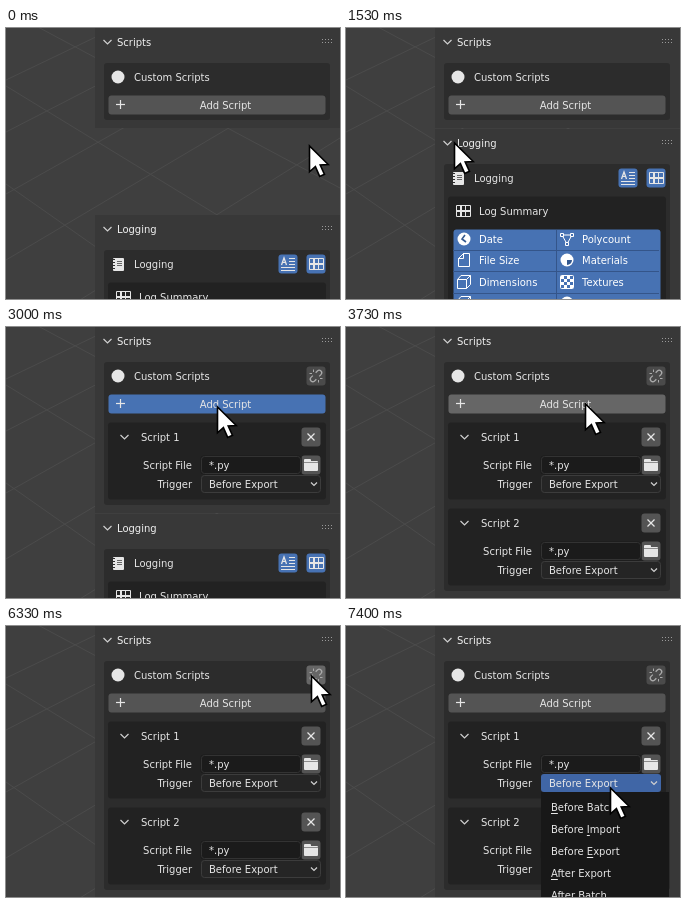
Animation of 334x271 px, one loop 8 s. Source, as an HTML page with a canvas:

```html
<!DOCTYPE html>
<html lang="en">
<head>
<meta charset="utf-8">
<title>Script panel</title>
<style>
html, body { margin: 0; width: 100%; height: 100%; overflow: hidden; background: #3f3f3f; }
canvas { display: block; width: 334px; height: 271px; }
</style>
</head>
<body>
<canvas id="stage" width="334" height="271"></canvas>
<script>
const ctx = document.getElementById('stage').getContext('2d');
const LOOP = 8000, FPS = 15;
const BLUE = '#4772b3', WHITE = '#e6e6e6', GREY = '#545454', HOVER = '#666666', INNER = '#222222';
let cursor = { x: 0, y: 0 };

// ---- drawing helpers ----
function box(x, y, w, h, color, r = 3) {
  ctx.fillStyle = color;
  ctx.beginPath();
  ctx.roundRect(x, y, w, h, r);
  ctx.fill();
}

function outline(x, y, w, h, color, r = 3) {
  ctx.strokeStyle = color;
  ctx.lineWidth = 1;
  ctx.beginPath();
  ctx.roundRect(x + .5, y + .5, w - 1, h - 1, r);
  ctx.stroke();
}

function text(s, x, y, align = 'left', color = WHITE) {
  ctx.font = '10px "DejaVu Sans", sans-serif';
  ctx.textAlign = align;
  ctx.fillStyle = color;
  ctx.fillText(s, x, Math.round(y) + 4);
}

function line(points, color = WHITE, width = 1.2, close = false) {
  ctx.strokeStyle = color;
  ctx.lineWidth = width;
  ctx.beginPath();
  points.forEach(([x, y]) => ctx.lineTo(x, y));
  if (close) ctx.closePath();
  ctx.stroke();
}

function disc(x, y, r, color = WHITE) {
  ctx.fillStyle = color;
  ctx.beginPath();
  ctx.arc(x, y, r, 0, Math.PI * 2);
  ctx.fill();
}

const chevron = (x, y, s = 4) =>
  line([[x - s, y - s / 2], [x, y + s / 2], [x + s, y - s / 2]], '#d0d0d0', 1.2);

const hovered = (x, y, w, h) =>
  cursor.x >= x && cursor.x < x + w && cursor.y >= y && cursor.y < y + h;

function button(x, y, w, h, pressed = false, base = GREY, over = HOVER) {
  box(x - .5, y - .5, w + 1, h + 1, pressed ? BLUE : hovered(x, y, w, h) ? over : base);
}

// ---- icons, centred on x, y ----
const icons = {
  table(x, y, back) {
    box(x - 7, y - 6, 15, 12, WHITE, 1);
    for (const dy of [-5, 1]) {
      box(x - 6, y + dy, 3, 4, back, 0);
      box(x - 1, y + dy, 8, 4, back, 0);
    }
    box(x + 2, y - 5, 1, 10, WHITE, 0);
  },
  card(x, y) {
    line([[x - 6.5, y + 1], [x - 4, y - 6], [x - 1.5, y + 1]], WHITE, 1.3);
    line([[x - 6, y - 1.5], [x - 2, y - 1.5]], WHITE, 1);
    for (const dy of [-5.5, -2.5, .5]) line([[x + 1, y + dy], [x + 7, y + dy]], WHITE, 1);
    for (const dy of [3.5, 6.5]) line([[x - 7, y + dy], [x + 7, y + dy]], WHITE, 1);
  },
  book(x, y) {
    box(x - 5, y - 6, 11, 13, WHITE, 1);
    for (let i = 0; i < 4; i++) {
      box(x - 6, y - 5 + i * 3, 3, 1, '#2c2c2c', 0);
      if (i < 3) box(x - 1, y - 3 + i * 2, 5, 1, '#666', 0);
    }
  },
  clock(x, y) {
    disc(x, y, 6.5, '#fff');
    line([[x + 1, y - 4], [x - 2, y], [x + 2, y + 3]], '#34598f', 1.6);
  },
  mesh(x, y) {
    const pts = [[x - 5, y - 4], [x + 5, y - 4], [x, y + 5]];
    line(pts, '#fff', 1, true);
    for (const [px, py] of pts) {
      box(px - 2, py - 2, 4, 4, '#fff', 1);
      box(px - 1, py - 1, 2, 2, BLUE, 0);
    }
  },
  file(x, y) {
    line([[x - 1, y - 6.5], [x + 5.5, y - 6.5], [x + 5.5, y + 6.5], [x - 5.5, y + 6.5], [x - 5.5, y - 2]], '#fff', 1);
    line([[x - 5.5, y - 1.5], [x - .5, y - 1.5], [x - .5, y - 6.5]], '#fff', 1, true);
  },
  sphere(x, y) {
    disc(x, y, 6.5, '#fff');
    ctx.fillStyle = '#34598f';
    ctx.beginPath();
    ctx.moveTo(x, y);
    ctx.arc(x, y, 5, 0, Math.PI / 2);
    ctx.fill();
  },
  cube(x, y) {
    outline(x - 7, y - 3, 10, 10, '#fff', 0);
    line([[x - 6.5, y - 2.5], [x - 3, y - 6.5], [x + 6.5, y - 6.5], [x + 6.5, y + 2.5], [x + 2.5, y + 6.5]], '#fff', 1);
    line([[x + 2.5, y - 2.5], [x + 6.5, y - 6.5]], '#fff', 1);
  },
  checker(x, y) {
    outline(x - 7, y - 7, 14, 14, '#fff', 1);
    for (let i = 0; i < 16; i++)
      if ((i + (i >> 2)) % 2 === 0) box(x - 6 + (i % 4) * 3, y - 6 + (i >> 2) * 3, 3, 3, '#fff', 0);
  },
  folder(x, y) {
    box(x - 7, y - 6, 7, 4, WHITE, 1);
    box(x - 7, y - 4, 14, 10, WHITE, 1);
    line([[x - 7, y - 2.5], [x + 7, y - 2.5]], '#777', .8);
  },
  cross(x, y) {
    line([[x - 3.5, y - 3.5], [x + 3.5, y + 3.5]]);
    line([[x + 3.5, y - 3.5], [x - 3.5, y + 3.5]]);
  },
  link(x, y, joined) {
    const color = joined ? '#fff' : '#aaa';
    ctx.save();
    ctx.translate(x, y);
    ctx.rotate(-Math.PI / 4);
    ctx.strokeStyle = color;
    ctx.lineWidth = 1.3;
    for (const side of [-1, 1]) {
      ctx.beginPath();
      if (joined) {
        ctx.roundRect(side * 3 - 3.8, -2.4, 7.6, 4.8, 2.4);
      } else {
        ctx.moveTo(side * 2, -2.5);
        ctx.lineTo(side * 4.5, -2.5);
        ctx.arc(side * 4.5, 0, 2.5, -Math.PI / 2, Math.PI / 2, side < 0);
        ctx.lineTo(side * 2, 2.5);
      }
      ctx.stroke();
    }
    ctx.restore();
    if (joined) return;
    for (const s of [-1, 1]) {
      line([[x + s * 2.5, y + s * 4], [x + s * 2.5, y + s * 6.5]], color, 1);
      line([[x + s * 4, y + s * 2.5], [x + s * 6.5, y + s * 2.5]], color, 1);
    }
  }
};

// ---- scene parts ----
function viewport() {
  ctx.fillStyle = '#3f3f3f';
  ctx.fillRect(0, 0, 334, 271);
  for (const [y0, y1] of [[-76, 84], [-18, 160], [58, 262], [156, 390]]) line([[0, y0], [334, y1]], '#4b4b4b', 1);
  for (const [y0, y1] of [[52, -108], [104, -68], [166, -22], [232, 34], [318, 110]]) line([[0, y0], [334, y1]], '#4b4b4b', 1);
}

function panel(top, height, title) {
  box(89, top, 245, height, '#383838', 0);
  chevron(101.5, top + 14);
  text(title, 111, top + 14, 'left', '#f0f0f0');
  for (let i = 0; i < 8; i++) box(316 + (i % 4) * 3, top + 11 + (i >> 2) * 3, 1, 1, '#9a9a9a', 0);
}

function dropdown(x, y, w, open) {
  box(x, y, w, 18, open ? '#4066a6' : hovered(x, y, w, 18) ? '#3a3a3a' : '#252525');
  if (!open) outline(x, y, w, 18, '#3c3c3c');
  text('Before Export', x + 8, y + 9);
  chevron(x + w - 7, y + 9, 3);
}

function scriptBox(index, top, linked, open) {
  box(102, top - .5, 218, linked ? 57 : 77, INNER);
  chevron(118.5, top + 14);
  text('Script ' + (index + 1), 135, top + 14);
  button(296, top + 5, 18, 18);
  icons.cross(305, top + 14);

  text('Script File', 186, top + 42, 'right');
  button(296, top + 33, 18, 18);
  icons.folder(305, top + 42);
  button(195, top + 33, 100, 18, false, '#1b1b1b', '#242424');
  outline(195, top + 33, 100, 18, '#333');
  text('*.py', 203, top + 42);

  if (linked) return;
  text('Trigger', 186, top + 61, 'right');
  dropdown(195, top + 52, 120, open);
}

function scriptsPanel({ count, linked, addPressed, linkPressed, menuOpen }) {
  const pitch = linked ? 66 : 86;
  const bottom = 92 + count * pitch + (linked ? 27 : 0);
  panel(0, bottom + 8, 'Scripts');
  box(98, 35, 226, bottom - 35, '#2c2c2c');
  disc(112, 49, 6.5);
  text('Custom Scripts', 128, 49);
  if (count) {
    const base = linked ? BLUE : '#4a4a4a', over = linked ? '#5a85c5' : HOVER;
    button(301, 40, 18, 18, linkPressed, base, over);
    icons.link(310, 49, linked);
  }
  button(103, 68, 216, 18, addPressed);
  line([[110, 76.5], [119, 76.5]]);
  line([[114.5, 72], [114.5, 81]]);
  text('Add Script', 219.5, 77, 'center');

  for (let i = 0; i < count; i++) scriptBox(i, 96 + i * pitch, linked, menuOpen && i === 0);
  if (linked) {
    text('Trigger', 186, 237, 'right');
    dropdown(195, 228, 124, false);
  }
}

const LOG_ITEMS = [
  ['Date', 'clock'], ['Polycount', 'mesh'],
  ['File Size', 'file'], ['Materials', 'sphere'],
  ['Dimensions', 'cube'], ['Textures', 'checker'],
  ['Objects', 'cube'], ['Animation', 'sphere']
];

function loggingPanel(top) {
  panel(top, 300, 'Logging');
  box(98, top + 35, 226, 300, '#2c2c2c');
  icons.book(112, top + 49);
  text('Logging', 128, top + 49);
  button(273, top + 40, 18, 18, true);
  icons.card(282, top + 49);
  button(301, top + 40, 18, 18, true);
  icons.table(310, top + 49, BLUE);
  box(102, top + 67.5, 218, 300, INNER);
  icons.table(117, top + 82, INNER);
  text('Log Summary', 133, top + 82);

  box(107.5, top + 100.5, 207, 200, BLUE);
  box(210, top + 101, 1, 200, '#34558a', 0);
  LOG_ITEMS.forEach(([label, icon], i) => {
    const x = 107 + (i % 2) * 103, y = Math.round(top + 110 + (i >> 1) * 21.4);
    box(x, y + 11, 103, 1, '#34558a', 0);
    icons[icon](x + 11, y);
    text(label, x + 26, y, 'left', '#fff');
  });
}

const MENU = [['Before Batch', 0], ['Before Import', 7], ['Before Export', 7], ['After Export', 0], ['After Batch', 1]];

function menu() {
  box(195, 166, 128, 120, '#181818', 0);
  MENU.forEach(([label, key], i) => {
    const y = 181 + i * 22;
    text(label, 205, y);
    const x = 205 + ctx.measureText(label.slice(0, key)).width;
    box(x, y + 6, ctx.measureText(label[key]).width, 1, WHITE, 0);
  });
}

function drawCursor() {
  const shape = [[0, 0], [0, 25], [5.5, 20], [9.5, 29.5], [14, 27.5], [10, 18.5], [17.5, 18]];
  ctx.save();
  ctx.translate(cursor.x + .5, cursor.y);
  ctx.scale(1.07, 1.03);
  ctx.fillStyle = '#fff';
  ctx.beginPath();
  shape.forEach(([x, y]) => ctx.lineTo(x, y));
  ctx.closePath();
  ctx.fill();
  line(shape, '#000', 1.5, true);
  ctx.restore();
}

// ---- timeline, in ticks of 1/15 s ----
const smooth = u => u * u * (3 - 2 * u);
const easeIn = u => Math.pow(u, 1.4);
const easeOut = u => 1 - Math.pow(1 - u, 1.5);
const PATH = [
  [0, 303, 118], [4, 303, 118], [10, 50, 106, smooth],
  [19, 50, 106], [23, 108, 115, easeIn], [27, 211, 80, easeOut],
  [53, 211, 80], [56, 239, 77, easeIn], [64, 305, 50, easeOut],
  [100, 305, 50], [107, 264, 162, smooth], [120, 264, 162]
];

function cursorAt(tick) {
  const i = PATH.findIndex(p => p[0] > tick);
  const [t0, x0, y0] = PATH[i - 1], [t1, x1, y1, ease = u => u] = PATH[i];
  const u = ease((tick - t0) / (t1 - t0));
  return { x: Math.round(x0 + (x1 - x0) * u), y: Math.round(y0 + (y1 - y0) * u) };
}

function loggingTop(tick, linked) {
  if (linked) return 261;
  if (tick < 3) return [187, 118, 101][tick];
  if (tick < 35) return 101;
  if (tick < 36) return 170;
  return tick < 48 ? 187 : 273;
}

function draw(ms) {
  const tick = Math.floor((ms + 3.5) * FPS / 1000) % (LOOP * FPS / 1000);
  const during = (a, b) => tick >= a && tick < b;
  const linked = during(72, 95), menuOpen = tick >= 111;
  cursor = cursorAt(tick);
  viewport();
  scriptsPanel({
    count: tick < 34 ? 0 : tick < 47 ? 1 : 2,
    linked,
    menuOpen,
    addPressed: during(32, 34) || during(45, 47),
    linkPressed: during(70, 72)
  });
  loggingPanel(loggingTop(tick, linked));
  if (menuOpen) menu();
  drawCursor();
}

const start = performance.now();
function loop() {
  draw((performance.now() - start) % LOOP);
  requestAnimationFrame(loop);
}
loop();
</script>
</body>
</html>
```
